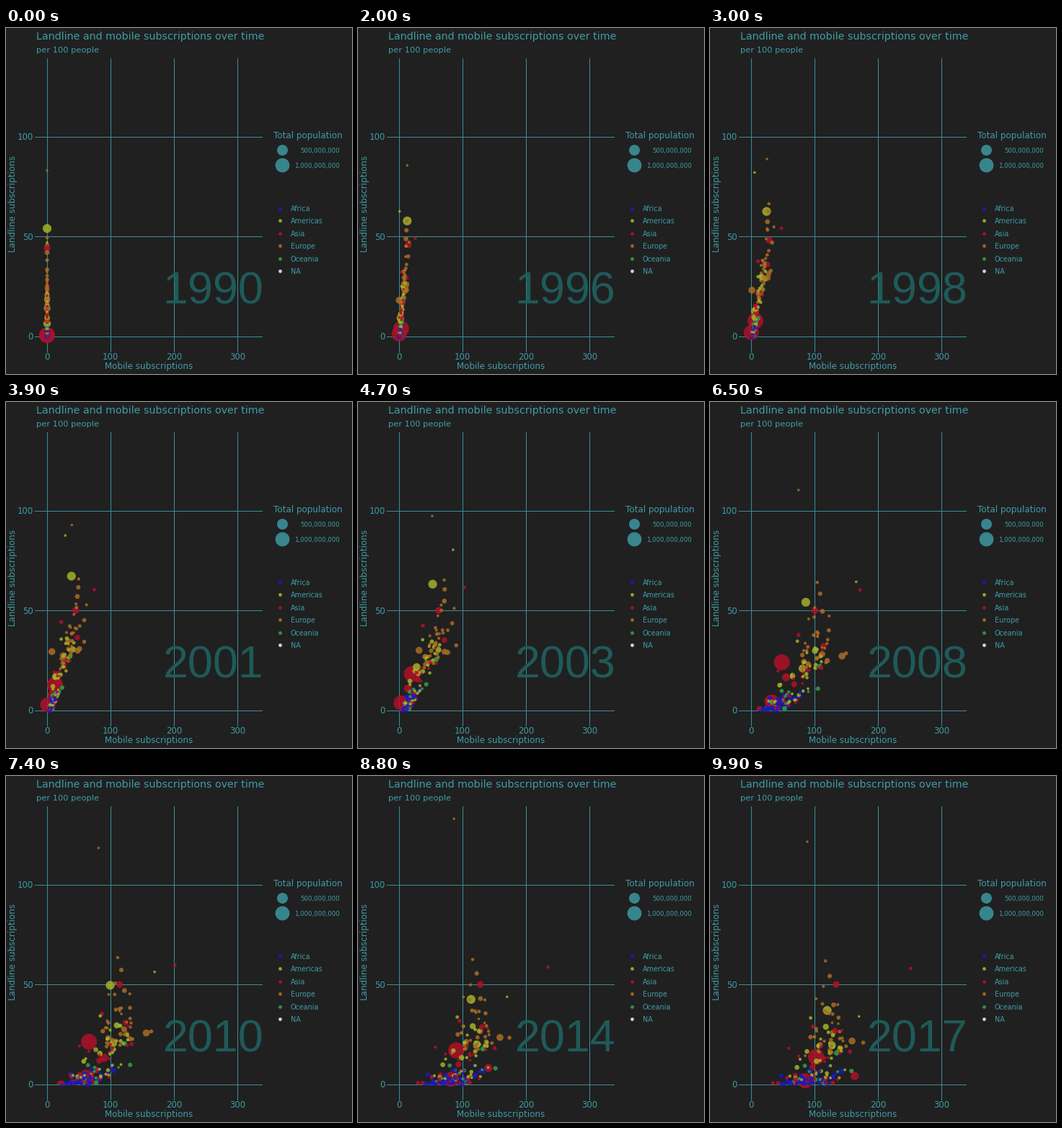
These frames come from a looping animation (480x480 px, 10000 ms). A matplotlib script:

```python
import numpy as np
import matplotlib.pyplot as plt
from matplotlib.animation import FuncAnimation

FRAMES, SIZE, DPI = 100, 480, 100
BG, INK, GRID, YEAR = "#202020", "#3e9ca8", "#3b8f96", "#1f5a59"
COLORS = {
    "Africa": "#1a1abe",
    "Americas": "#a3b32a",
    "Asia": "#b01028",
    "Europe": "#ab6c24",
    "Oceania": "#2fa148",
    "NA": "#e6e6e6",
}
# Region: number of small countries, lowest and highest wealth, skew
REGIONS = {
    "Africa": (50, 0.02, 0.45, 1.6),
    "Americas": (33, 0.25, 0.80, 1.0),
    "Asia": (36, 0.05, 0.90, 1.2),
    "Europe": (38, 0.58, 1.00, 1.0),
    "Oceania": (12, 0.10, 0.85, 1.2),
}
YEAR_KEYS = np.round(np.arange(28) * (FRAMES - 1) / 27)

rng = np.random.default_rng(5)
countries = []


def px(mobile):
    return 57 + 0.881 * mobile


def py(landline):
    return 427.7 - 2.77 * landline


def radius(pop):
    """Bubble radius in pixels for a population in billions."""
    return 1.7 + 8.2 * np.sqrt(pop)


def area(r):
    return (2 * r * 72 / DPI) ** 2


def country(region, pop, top, mid, pace, lines, peak=None):
    """Mobile use saturates at `top`; landlines run start, peak, end."""
    countries.append((COLORS[region], pop, top, mid, pace, *lines, peak or mid - 13))


def small_country(region, low, high, skew):
    """Wealth sets how early mobiles arrive and how many landlines exist."""
    wealth = low + (high - low) * rng.random() ** skew
    pop = min(rng.lognormal(np.log(0.006), 1.4), 0.09)
    top = (70 + 60 * np.sqrt(wealth)) * rng.normal(1, 0.3 - 0.2 * wealth)
    mid = 76 - 36 * wealth + rng.normal(0, 2.5)
    most = 0.3 + 60 * wealth ** 2 * rng.uniform(0.8, 1.15)
    lines = most * (0.15 + 0.6 * wealth), most, most * rng.uniform(0.5, 0.95)
    country(region, pop, top, mid, 11, lines)


# The largest countries and the far outliers
country("Asia", 1.30, 117, 70, 15, (0.6, 26.5, 13.7))
country("Asia", 1.13, 86, 68, 6.5, (0.6, 4.8, 1.8))
country("Americas", 0.29, 127, 51, 17, (54, 67.7, 37))
country("Asia", 0.23, 180, 74, 11, (0.6, 18, 4.2))
country("Americas", 0.19, 130, 60, 10, (6.4, 21.7, 19.6))
country("Europe", 0.144, 159, 54, 5, (14, 31, 21.7))
country("Asia", 0.127, 140, 49, 16, (44, 50, 50))
country("Europe", 0.0001, 90, 41, 14, (83, 133, 121.5), peak=88)
country("Asia", 0.007, 272, 54, 18, (45, 62, 58))
country("Americas", 0.0001, 170, 47, 5, (47, 92, 34))

for region, (count, *wealth) in REGIONS.items():
    for _ in range(count):
        small_country(region, *wealth)

countries.sort(key=lambda c: -c[1])
colors, *columns = zip(*countries)
pop, top, mid, pace, first, most, last, peak = map(np.array, columns)


def logistic(i):
    return 1 / (1 + np.exp((mid - i) / pace))


def positions(i):
    mobile = top * (logistic(i) - logistic(0) * (1 - i / FRAMES))
    rise = first + (most - first) * (i / peak) ** 2
    fall = most + (last - most) * (i - peak) / (FRAMES - 1 - peak)
    return np.column_stack([px(mobile), py(np.where(i < peak, rise, fall))])


fig = plt.figure(figsize=(SIZE / DPI, SIZE / DPI), dpi=DPI, facecolor=BG)
ax = fig.add_axes([0, 0, 1, 1])
ax.set(xlim=(0, SIZE), ylim=(SIZE, 0))
ax.axis("off")


def text(x, y, s, size, **kw):
    kw = {"color": INK, "va": "baseline", "family": "DejaVu Sans", **kw}
    return ax.text(x, y, s, fontsize=size * 72 / DPI, **kw)


# Panel
for v in (0, 100, 200, 300):
    ax.plot([px(v)] * 2, [42, 449], color=GRID, lw=0.72, zorder=1)
    text(px(v), 460, str(v), 11.7, ha="center")
for v in (0, 50, 100):
    ax.plot([40, 355], [py(v)] * 2, color=GRID, lw=0.72, zorder=1)
    text(38, py(v) + 4.6, str(v), 11.7, ha="right")

text(42.5, 16, "Landline and mobile subscriptions over time", 14.2)
text(42.5, 34, "per 100 people", 11.5)
text(198.5, 473, "Mobile subscriptions", 11.9, ha="center")
text(10, 244, "Landline subscriptions", 11.9, ha="center", va="center", rotation=90)

# Legends
text(371, 153, "Total population", 11.9)
for y, size, name in ((169, 0.5, "500,000,000"), (190, 1, "1,000,000,000")):
    ax.scatter(382.8, y, s=area(radius(size)), color="#38858e", lw=0)
    text(463, y + 4, name, 8.7, ha="right")
for k, (name, color) in enumerate(COLORS.items()):
    y = 250.1 + 17.35 * k
    ax.scatter(379.7, y, s=area(2.4), color=color, alpha=0.9, lw=0)
    text(394.5, y + 4, name, 9.7)

year = text(287.5, 382.7, "1990", 62.7, ha="center", color=YEAR,
            family="Liberation Sans", zorder=2)
dots = ax.scatter(*positions(0).T, s=area(radius(pop)), c=colors,
                  alpha=0.85, lw=0, zorder=3)


def update(i):
    dots.set_offsets(positions(i))
    passed = np.interp(i, YEAR_KEYS, np.arange(28))
    year.set_text(str(1990 + int(passed + 0.5)))
    return dots, year


anim = FuncAnimation(fig, update, frames=FRAMES, interval=100, repeat=True, repeat_delay=0)
plt.show()
```
